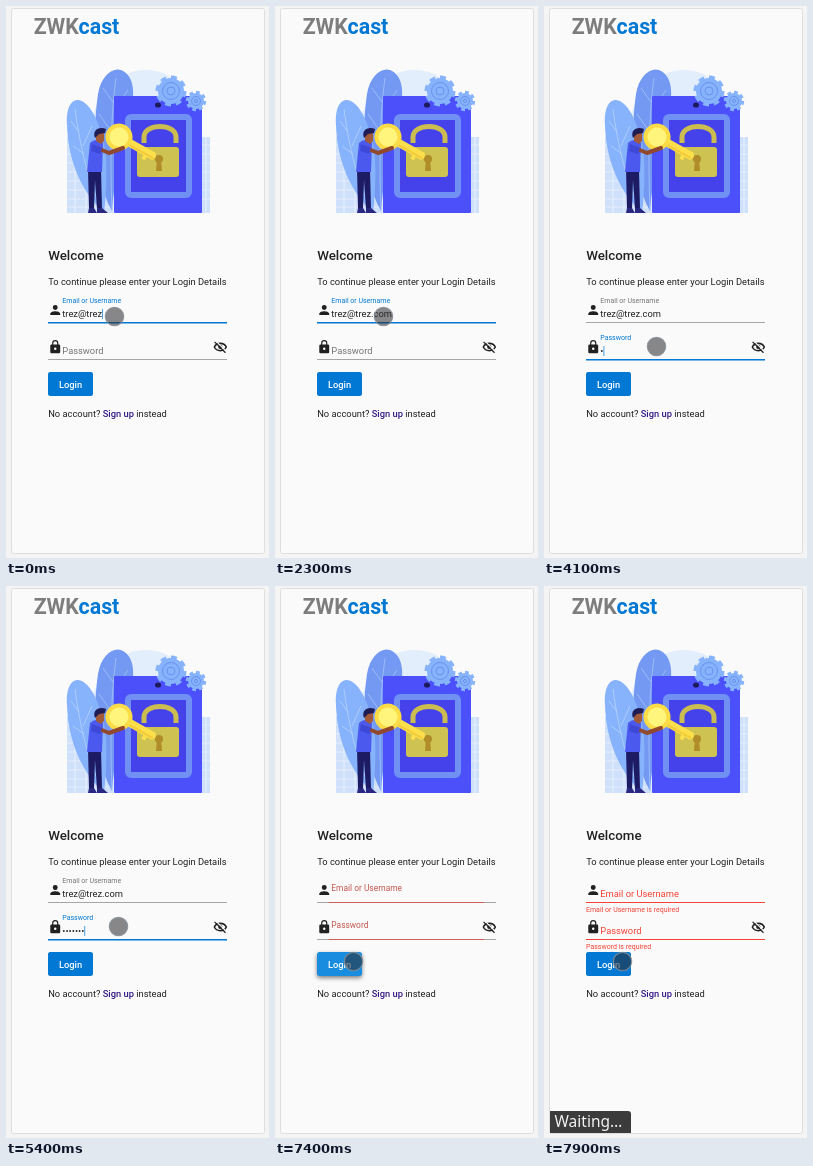
Recreate the animation shown at these times as an HTML page. Size 263 px wide and 552 px high, loop 8000 ms.

```html
<!DOCTYPE html>
<html lang="en">
<head>
<meta charset="utf-8">
<title>Login</title>
<style>
html, body { margin: 0; width: 100%; height: 100%; overflow: hidden; background: #f4f4f4; }
svg { display: block; width: 100%; height: 100%; }
text { font: 9.333px Roboto, sans-serif; fill: #212121; white-space: pre; }
.title { font-size: 21.333px; font-weight: 700; }
.heading { font-size: 13.333px; font-weight: 500; }
.error { font-size: 7px; fill: #f44336; }
.status { font: 15.5px "Noto Sans", sans-serif; fill: #f2f2f2; }
</style>
</head>
<body>
<svg viewBox="0 0 263 552">
  <rect x="5.5" y="2.5" width="253" height="545" rx="2" fill="#fafafa" stroke="#dedede"/>
  <text class="title" x="27.7" y="27.5" style="fill:#7d7d7d">ZWK<tspan fill="#0078d4">cast</tspan></text>

  <g id="illustration">
    <path d="M81 207C68 145 86 65 139 64C184 64 202 113 198 207Z" fill="#e3eefc"/>
    <path d="M61 131H107V207H61ZM181 131H204V207H181Z" fill="#cfe0fb"/>
    <path d="M61 139H107M61 148H107M61 157H107M61 166H107M61 175H107M61 184H107M61 193H107M61 201H107M196 139H204M196 148H204M196 157H204M196 166H204M196 175H204M196 184H204M196 193H204M69 131V207M80 131V207M200 131V207" stroke="#e4eefd" stroke-width="1.2"/>
    <path d="M106 205C85 165 88 116 92 88C95 70 106 61 115 64C127 69 129 84 126 99C122 126 111 150 106 205Z" fill="#7399f2"/>
    <path d="M110 72C105 110 104 150 106 205M108 105L122 84M107 96L97 82M105 125L93 108" fill="none" stroke="#a8c2fa" stroke-width=".8"/>
    <path d="M98 207C75 185 62 154 61 119C60 104 64 94 72 94C85 95 97 122 100 152C101 172 100 191 98 207Z" fill="#86b3fb"/>
    <path d="M69 103C74 140 82 177 98 207M73 126L65 115M78 148L67 140M77 140L86 120" fill="none" stroke="#b8d3fd" stroke-width=".8"/>

    <rect x="108" y="90" width="88" height="117" rx="1" fill="#4c50fb"/>
    <rect x="122" y="111" width="61" height="78" rx="3" fill="#4642eb" stroke="#7190f4" stroke-width="6"/>
    <path d="M138 137V131C138 117 170 117 170 131V137" fill="none" stroke="#cbbd50" stroke-width="5"/>
    <rect x="131" y="141" width="42" height="30" rx="3" fill="#cec253"/>
    <path d="M151 153H155L156 165H150Z" fill="#b08d28"/>
    <circle cx="153" cy="153" r="4" fill="#b08d28"/>

    <g fill="#86b3fb" stroke="#86b3fb">
      <circle cx="165" cy="85" r="13" stroke="none"/>
      <circle cx="165" cy="85" r="13.5" fill="none" stroke-width="4" pathLength="16" stroke-dasharray="1.1 .9"/>
      <circle cx="165" cy="85" r="8.5" stroke="#6a92ee"/>
      <circle cx="165" cy="85" r="4" stroke="#6a92ee"/>
      <circle cx="190" cy="95" r="8" stroke="none"/>
      <circle cx="190" cy="95" r="8.7" fill="none" stroke-width="3" pathLength="16" stroke-dasharray="1.1 .9"/>
      <circle cx="190" cy="95" r="4.5" stroke="#6a92ee"/>
      <circle cx="190" cy="95" r="1.6" stroke="#6a92ee"/>
    </g>
    <ellipse cx="152" cy="99" rx="3" ry="2.6" fill="#1c1a5b"/>

    <path d="M82 163H95L96 203H91L89 174L88 203H83Z" fill="#1e1b65"/>
    <path d="M83 202H88L91 207H82ZM91 202H96L102 207H91Z" fill="#2a2780"/>
    <path d="M84 137Q90 131 97 137L96 166H81Z" fill="#4b59ee"/>
    <path d="M90 127H98V135L95 138L90 135Z" fill="#a25a38"/>
    <path d="M89 132C86 124 93 120 100 123L99 127L93 128Z" fill="#201c55"/>
    <g transform="rotate(29 113 131)">
      <path d="M124 127H153L155 131L153 135H147V139H143V135H124Z" fill="#fcdf4b"/>
      <path d="M124 132H153V134H124Z" fill="#f3cb3a"/>
      <circle cx="113" cy="131" r="13.5" fill="#fbdc46"/>
      <circle cx="113" cy="131" r="9.5" fill="#fff57c"/>
    </g>
    <path d="M91 142L103 147L117 142" fill="none" stroke="#91492d" stroke-width="4" stroke-linecap="round" stroke-linejoin="round"/>
    <path d="M86 138L96 142L94 148L85 145Z" fill="#3d49d6"/>
  </g>

  <text class="heading" x="42.2" y="254">Welcome</text>
  <text x="42.2" y="279">To continue please enter your Login Details</text>

  <g id="fields"></g>
  <path transform="translate(41.8 296.5) scale(.62)" fill="#212121" d="M12 12a4 4 0 1 0 0-8 4 4 0 0 0 0 8zm0 2c-2.7 0-8 1.3-8 4v2h16v-2c0-2.7-5.3-4-8-4z"/>
  <path transform="translate(41.8 333.5) scale(.62)" fill="#212121" fill-rule="evenodd" d="M18 8h-1V6A5 5 0 0 0 7 6v2H6a2 2 0 0 0-2 2v10a2 2 0 0 0 2 2h12a2 2 0 0 0 2-2V10a2 2 0 0 0-2-2zM8.9 8V6a3.1 3.1 0 0 1 6.2 0v2zM12 17a2 2 0 1 1 0-4 2 2 0 0 1 0 4z"/>
  <g transform="translate(207 333.7) scale(.61)" fill="none" stroke="#212121">
    <path d="M2.2 12C6 4 18 4 21.8 12C18 20 6 20 2.2 12Z" stroke-width="2.6"/>
    <circle cx="12" cy="12" r="3" fill="#212121"/>
    <path d="M4.500 2L22 19.500" stroke="#fafafa" stroke-width="2"/>
    <path d="M2.600 3.500L20.500 21.400" stroke-width="2"/>
  </g>

  <rect id="button" x="42" y="366" width="45" height="24" rx="2.700"/>
  <text x="64.500" y="381.800" text-anchor="middle" style="fill:#fff;font-weight:500">Login</text>
  <text x="42.200" y="411">No account? <tspan fill="#341a87" font-weight="500">Sign up</tspan> instead</text>

  <g id="status">
    <path d="M6 525H84Q87 525 87 528V547H6Z" fill="#3b3b3b"/>
    <text class="status" x="10.500" y="541">Waiting…</text>
  </g>
  <circle id="touch" r="9.200" fill="rgba(45,45,50,.56)" stroke="rgba(134,140,148,.8)" stroke-width="1.200"/>
</svg>
<script>
const LOOP = 8000, STEP = 100;
const BLUE = [0, 120, 212], GRAY = [117, 117, 117], RED = [244, 67, 54];
const EMAIL = 'trez@trez.com';
const emailKeys = [[0, 9], [1600, 10], [1700, 12], [1800, 13], [7300, 0]];
const passwordKeys = [[0, 0], [4000, 1], [4300, 2], [4500, 3], [4700, 4], [4900, 5],
  [5100, 6], [5400, 7], [5900, 8], [7300, 0]];
const emailCaret = [[0, 500], [1000, 2300], [2900, 3100]];
const passwordCaret = [[3200, 3700], [4000, 6400], [6900, 7200]];

const $ = id => document.getElementById(id);
const clamp = v => Math.max(0, Math.min(1, v));
const mix = (a, b, p) => a + (b - a) * p;
const blend = (a, b, p) => `rgb(${a.map((v, i) => Math.round(mix(v, b[i], p)))})`;
const lengthAt = (keys, t) => keys.filter(k => k[0] <= t).pop()[1];
const within = (spans, t) => spans.some(([a, b]) => t >= a && t < b);
const set = (el, attrs) => { for (const k in attrs) el.setAttribute(k, attrs[k]); };

// cubic-bezier(.25, .8, .25, 1)
function ease(t, start, duration) {
  const x = clamp((t - start) / duration);
  if (x === 0 || x === 1) return x;
  let lo = 0, hi = 1;
  for (let i = 0; i < 20; i++) {
    const s = (lo + hi) / 2;
    if (.75 * s * (1 - s) + s ** 3 < x) lo = s; else hi = s;
  }
  return 2.4 * lo * (1 - lo) ** 2 + 3 * lo * lo * (1 - lo) + lo ** 3;
}

function add(parent, tag, attrs, content = '') {
  const el = document.createElementNS('http://www.w3.org/2000/svg', tag);
  set(el, attrs);
  el.textContent = content;
  return parent.appendChild(el);
}

function makeField(label, baseline) {
  const root = $('fields');
  add(root, 'rect', { x: 42, y: baseline + 5, width: 179, height: 1, fill: '#a6a6a6' });
  return {
    baseline,
    line: add(root, 'rect', { y: baseline + 5 }),
    label: add(root, 'text', {}, label),
    value: add(root, 'text', { x: 56.3, y: baseline }),
    caret: add(root, 'rect', { y: baseline - 8, width: .7, height: 10, fill: '#0078d4' }),
    error: add(root, 'text', { x: 42, class: 'error' }, label + ' is required')
  };
}

function drawField(f, t, { text, caret, floated, focus, grow }) {
  const red = ease(t, 7320, 400);
  const scale = mix(1, .75, floated);
  f.label.setAttribute('transform', `translate(56.3 ${f.baseline - 14.2 * floated}) scale(${scale})`);
  f.label.style.fill = red ? blend(GRAY, RED, red) : blend(GRAY, BLUE, focus);
  f.value.textContent = text;
  set(f.caret, { x: 56.4 + (text ? f.value.getComputedTextLength() : 0), opacity: caret ? 1 : 0 });

  const spread = red ? mix(.5, 1, ease(t, 7320, 300)) : mix(.5, 1, grow);
  set(f.line, {
    x: 131.5 - 89.5 * spread, width: 179 * spread, height: red ? 1 : 1.5,
    fill: red ? blend([170, 80, 80], RED, red) : '#0078d4',
    opacity: red ? ease(t, 7320, 300) : focus
  });

  const shown = clamp((t - 7500) / 300);
  set(f.error, { y: f.baseline + 15 - 3.5 * (1 - shown), opacity: shown });
}

function drawTouch(t) {
  let x = 108.5, y = 310.5;
  if (t >= 2900) {
    const p = ease(t, 6500, 400);
    x = mix(112.5, 78.5, p);
    y = mix(340.5, 375.5, p);
  }
  set($('touch'), { cx: x, cy: y });
}

const email = makeField('Email or Username', 311);
const password = makeField('Password', 348);

function draw(t) {
  const switched = ease(t, 3000, 400), blurred = ease(t, 7000, 300);
  const released = ease(t, 7320, 400);
  drawField(email, t, {
    text: EMAIL.slice(0, lengthAt(emailKeys, t)), caret: within(emailCaret, t),
    floated: 1 - released, focus: 1 - switched, grow: 1
  });
  drawField(password, t, {
    text: '•'.repeat(lengthAt(passwordKeys, t)), caret: within(passwordCaret, t),
    floated: switched * (1 - released), focus: switched * (1 - blurred), grow: ease(t, 3000, 300)
  });

  const press = ease(t, 7000, 300) * (1 - ease(t, 7400, 400));
  $('button').setAttribute('fill', blend(BLUE, [24, 140, 222], press));
  $('button').style.filter =
    `drop-shadow(0 ${mix(.7, 2.5, press)}px ${mix(.6, 2, press)}px rgba(0,0,0,${mix(.35, .5, press)}))`;
  $('status').setAttribute('opacity', t >= 7800 ? 1 : 0);
  drawTouch(t);
}

const start = performance.now();
function tick() {
  const t = (performance.now() - start) % LOOP;
  draw(Math.floor(t / STEP) * STEP);
  requestAnimationFrame(tick);
}
tick();
</script>
</body>
</html>
```
